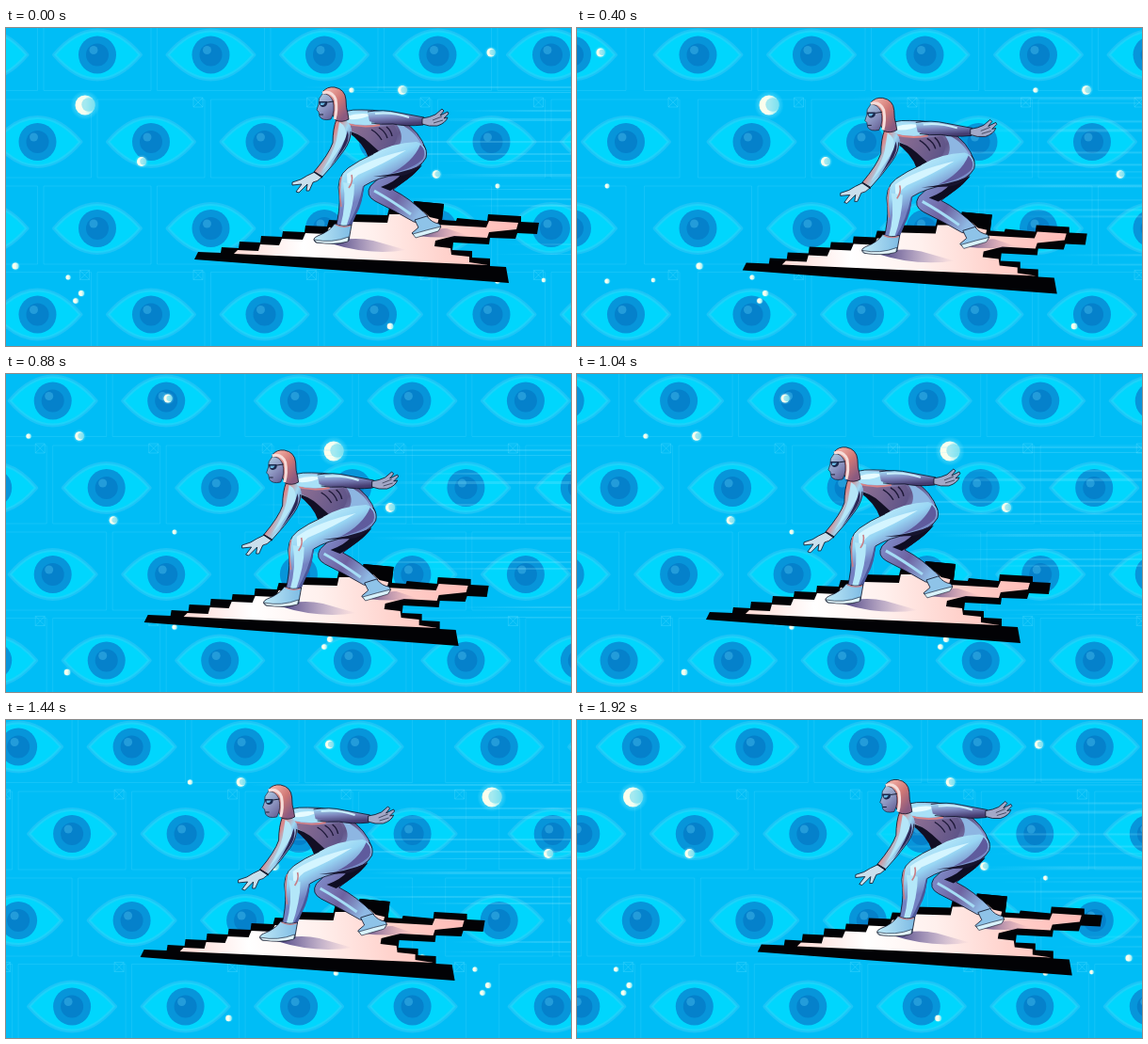
Recreate the animation shown at these times as an HTML page with a canvas. Size 600 px wide and 338 px high, loop 2000 ms.

```html
<!DOCTYPE html>
<html lang="en">
<head>
<meta charset="utf-8">
<title>Surfing the cursor</title>
<style>
html, body { margin: 0; width: 100%; height: 100%; overflow: hidden; background: #00bdf6; }
canvas { display: block; width: 600px; height: 338px; }
</style>
</head>
<body>
<canvas id="stage" width="600" height="338"></canvas>
<script>
const c = document.getElementById('stage').getContext('2d');
const STEP = 80, COUNT = 25;
const GAP = 120.5, EYES = 6;             // distance between eyes, eyes per row
const ROWS = [[-23.5, 28.5], [33.5, 121], [-23.5, 213], [33.5, 304.5]];
const MOONS = [                          // x, y, radius
  [84, 82, 10.5], [144, 142, 5], [10, 253, 3.5], [66, 265, 2.5], [80, 282, 3],
  [74, 290, 2.8], [408, 317, 3.2], [515, 26, 4.5], [421, 66, 4.8], [367, 66, 2.6],
  [457, 155.5, 4.3], [522, 168, 2.4], [571, 268, 2.2], [522, 269, 2.6]
];
const STREAKS = [                        // x, y, thickness
  [315, 62, 2], [330, 68, 1], [470, 87, 2], [440, 96, 3], [316, 120, 2],
  [328, 133, 2], [448, 141, 1], [440, 155, 3], [455, 171, 1], [410, 181, 2],
  [490, 188, 2], [530, 229, 2], [515, 240, 1]
];
const BOB = [[0, 0], [2, 4.5], [7, 16], [9, 18], [11, 18], [15, 11.8], [18, 6], [21, 2], [25, 0]];
const INK = '#0b1024';

function draw(d, fill, stroke, width = .8) {
  const p = new Path2D(d);
  if (fill) { c.fillStyle = fill; c.fill(p); }
  if (stroke) { c.strokeStyle = stroke; c.lineWidth = width; c.stroke(p); }
}

function blend(x0, y0, x1, y1, ...colors) {
  const g = c.createLinearGradient(x0, y0, x1, y1);
  colors.forEach((color, i) => g.addColorStop(i / (colors.length - 1), color));
  return g;
}

function disc(x, y, r, fill) {
  c.beginPath();
  c.arc(x, y, r, 0, 7);
  c.fillStyle = fill;
  c.fill();
}

function lerp(points, n) {
  const i = points.findIndex(p => p[0] > n);
  const [a, u] = points[i - 1], [b, v] = points[i];
  return u + (v - u) * (n - a) / (b - a);
}

function eye(x, y, marked) {
  c.save();
  c.translate(x, y);
  draw('M-57-45H57V38H-57Z', null, 'rgba(90,220,255,.28)');
  if (marked) draw('M45-47h10v10h-10zl10 10m0-10l-10 10', null, 'rgba(90,220,255,.4)');
  const lid = 'M-46 0Q-24-26 0-26Q24-26 46 0Q24 26 0 26Q-24 26-46 0Z';
  draw(lid, '#00d6fd', 'rgba(70,205,245,.4)', 4);
  disc(0, 0, 20, '#0795da');
  disc(0, 0, 12, '#0581cb');
  disc(-4, -5, 4.5, '#239cda');
  c.restore();
}

function eyes(shift) {
  ROWS.forEach(([x, y], row) => {
    for (let i = 0; i < EYES; i++) eye(x + i * GAP + shift, y, row % 2);
  });
}

function moon(x, y, r) {
  if (x < -15 || x > 615) return;
  const glow = c.createRadialGradient(x, y, r * .7, x, y, r * 1.5);
  glow.addColorStop(0, 'rgba(200,250,250,.45)');
  glow.addColorStop(1, 'rgba(160,245,255,0)');
  disc(x, y, r * 1.5, glow);
  disc(x, y, r, blend(x - r, y, x + r, y, '#fffde9', '#f4fff2', '#8de9f2'));
  if (r > 4) disc(x + r * .35, y - r * .05, r * .7, 'rgba(110,218,238,.6)');
}

function board() {
  draw('M200 246L204 238L228 239L229 233L247 234L248 227L270 228L271 221L293 222L294 216' +
    'L317 217L318 210L341 211L343 204L365 205L367 198L405 199L407 191L432 191L433 184' +
    'L465 187L463 204L478 205L479 202L511 205L512 198L547 200L547 206L566 207L564 219' +
    'L543 218L541 224L514 223L513 230L475 228L474 236L495 237L495 244L514 245L514 253' +
    'L531 254L534 271Z', '#020205');
  draw('M242 240L246 236L268 237L270 230L290 231L293 224L315 225L318 218L340 219L343 212' +
    'L365 213L368 206L405 207L407 198L432 198L434 194L461 197L458 209L510 212L513 205' +
    'L544 207L542 214L513 217L511 223L476 221L456 226L455 232L472 234L473 241L492 243' +
    'L492 249L512 252Z', blend(240, 240, 540, 215, '#ffd8d3', '#fff', '#fff0ed', '#ffd2cc', '#ffbcb8'));
  draw('M432 191L433 184L465 187L463 204L450 201L438 190Z', '#020205');
  draw('M345 229Q365 221 390 226L425 236Q385 242 345 229Z',
    blend(350, 0, 425, 0, 'rgba(45,35,110,.8)', 'rgba(120,90,160,0)'));
  draw('M437 221Q456 212 468 213L492 221Q463 224 437 221Z',
    blend(440, 0, 490, 0, 'rgba(45,35,110,.7)', 'rgba(160,100,150,0)'));
}

function farLeg() {
  draw('M443 136Q443 150 424 162Q416 168 411 172Q429 181 448 200L445 208L433 206Q414 195 392 184' +
    'Q381 178 387 168L405 151Z', blend(392, 165, 440, 195, '#7d86c4', '#6d62a0', '#8fb9e4'), INK);
  draw('M442 146Q428 162 408 173L398 169Q414 163 420 155Z', '#0e0d22');
  draw('M391 173Q409 183 430 198', null, '#a5dcf5', 3);
  draw('M434 204L447 200Q452 207 460 208Q464 212 458 215Q446 219 435 222L431 218L438 212Z',
    '#8ec3e8', INK);
  draw('M432 219Q449 214 462 211L459 216L435 223Z', '#d8f2fb', INK, .6);
}

function torso() {
  draw('M350 95Q358 86 378 87Q402 86 420 98Q440 110 446 130L436 142L393 136Q386 122 362 109Z',
    blend(370, 88, 425, 140, '#a4dcf5', '#8b86b8', '#625688', '#8a94cc'), INK);
  // chest shadow and ribs
  draw('M366 102Q388 108 412 103Q420 114 410 127Q398 128 390 130Q384 117 366 109Z',
    blend(370, 105, 412, 125, '#8a6d92', '#5e5488'));
  draw('M388 108q7 4 11 11M396 106q7 4 9 11M404 105q5 4 6 10', null, '#1d1838', 1.4);
  draw('M361 109Q374 111 385 121L396 131L385 138Q380 122 361 109Z', '#120f24');
  // lit shoulder and back
  draw('M355 94Q372 87 392 90Q406 94 400 101Q380 106 360 100Z', '#a8e0f7');
  draw('M361 94Q376 89 388 92Q378 98 364 97Z', '#e6fbff');
  draw('M412 99Q434 108 441 124Q430 122 418 124Q424 113 412 99Z', '#8db6e2');
  draw('M359 101Q378 107 397 103', null, '#d98386', 1.8);
}

function nearLeg() {
  draw('M390 134Q410 122 436 121Q449 126 446 138Q440 150 418 155Q394 159 380 168Q378 184 371 198' +
    'L365 213L350 213Q355 193 354 178Q350 159 363 149Q374 141 390 134Z',
    blend(385, 130, 405, 166, '#bdebfa', '#98d6f4', '#7482c2'));
  draw('M390 134Q374 141 363 149Q350 159 354 178Q355 193 350 213H365L371 198Q378 184 380 168' +
    'Q394 159 418 155Q440 150 446 138Q448 130 443 124', null, INK);
  draw('M362 155Q382 140 425 130Q402 144 374 156Q364 163 363 178Z', '#d4f5ff');
  draw('M358 164Q362 187 355 211L361 212Q370 187 370 166Z', '#b3e7f9');
  draw('M379 168Q375 190 362 212L366 212L372 198Q379 186 380 168Z', '#4c5799');
  draw('M440 124Q447 131 443 139Q434 149 408 155Q432 143 440 124Z', '#5f5b9d');
  draw('M390 158Q420 155 441 146Q432 155 420 157Z', '#17142e');
  draw('M356 158Q353 172 356 190M367 156Q369 163 364 170', null, '#c77f88', 1.6);
  draw('M349 208Q358 212 367 209L364 226Q355 230 347 229L329 228Q324 224 331 221Q344 216 349 208Z',
    blend(328, 220, 366, 220, '#bde8f7', '#7fbce4'), INK);
  draw('M327 225Q346 229 364 222L363 227Q348 231 330 228Z', '#e2f5fb', INK, .6);
  draw('M350 209Q358 213 366 210', null, '#c77f88', 1.3);
}

function arms() {
  // trailing arm and hand
  draw('M384 90Q400 86 417 90L444 95L443 103Q425 105 411 102Q396 103 386 99Z',
    blend(390, 89, 391, 104, '#9fd6f2', '#7c83ba', '#453c70'));
  draw('M384 89Q400 86 417 90L444 95L443 103Q425 105 411 102Q398 103 388 101', null, INK);
  draw('M392 91Q410 89 428 95', null, '#c8effb', 2);
  draw('M442 96Q450 95 456 92L463 86L465 88L461 93L469 89L470 91L465 96L469 95Q467 101 458 104' +
    'Q449 105 442 102Z', '#a3a9c8', INK);
  draw('M453 98L463 94M454 101L464 98', null, INK, .6);
  // leading arm and hand
  draw('M351 95Q362 94 367 107Q368 118 359 130Q350 143 336 158L327 153Q343 134 347 122' +
    'Q347 107 351 95Z', blend(344, 120, 362, 129, '#d98a8d', '#9fd8f2', '#6f7dbb'));
  draw('M351 97Q347 107 347 122Q343 134 327 153L336 158Q350 143 359 130Q366 120 366 110', null, INK);
  draw('M354 100Q362 104 361 116Q354 131 336 152Q348 132 351 119Z', '#b5e6f8');
  draw('M363 109Q366 119 357 131L344 148Q359 126 363 109Z', '#2d2856');
  draw('M328 153L336 158Q330 164 326 164L322 173L319 173L320 166L311 175L308 174L314 166' +
    'L304 167L304 164L313 161Q319 157 328 153Z', '#c9dfec', INK);
  draw('M327 153L336 159', null, INK, 1.2);
}

function head() {
  draw('M336 68Q341 62 349 63Q360 65 361 76Q361 85 363 91L364 97Q357 101 350 98L341 81Z',
    blend(340, 68, 364, 88, '#efaaa0', '#cf7775', '#8a5a80'), INK);
  draw('M336 70Q331 75 332 81L330 87L332 89L333 94Q336 99 345 97Q350 88 347 77Q343 69 336 70Z',
    blend(331, 75, 349, 94, '#a9c4de', '#8b93bf', '#655f94'), INK, .6);
  draw('M336 69Q346 66 350 76Q352 87 349 97', null, '#f6dcd9', 3);
  draw('M332 78H341Q342 83 337 84Q333 84 332 78Z', '#1b284c');
  draw('M334 79.5H339L337 82H334Z', '#67b4de');
  draw('M341 79L348 78M333 92h4', null, INK, .9);
}

function scene(n) {
  const left = COUNT - n;                // steps until the loop closes
  c.setTransform(1, 0, 0, 1, 0, 0);
  c.lineJoin = 'round';
  c.fillStyle = '#00bdf6';
  c.fillRect(0, 0, 600, 338);

  // one sheet leaves to the right while its copy arrives a little slower
  eyes(30.4 * n);
  eyes(-29.2 * left);
  for (const [x, y, r] of MOONS) {
    moon(x + 24 * n, y, r);
    moon(x - 24.5 * left, y, r);
  }

  c.translate(Math.max(-4.85 * n, -8.2 * left), lerp(BOB, n));
  for (const [x, y, h] of STREAKS) {
    c.fillStyle = blend(x, 0, x + 90, 0, 'rgba(150,235,255,0)', 'rgba(150,235,255,.22)');
    c.fillRect(x, y, 700, h);
  }
  board();
  farLeg();
  torso();
  nearLeg();
  arms();
  head();
}

function tick() {
  scene(Math.floor(performance.now() / STEP) % COUNT);
  requestAnimationFrame(tick);
}
tick();
</script>
</body>
</html>
```
